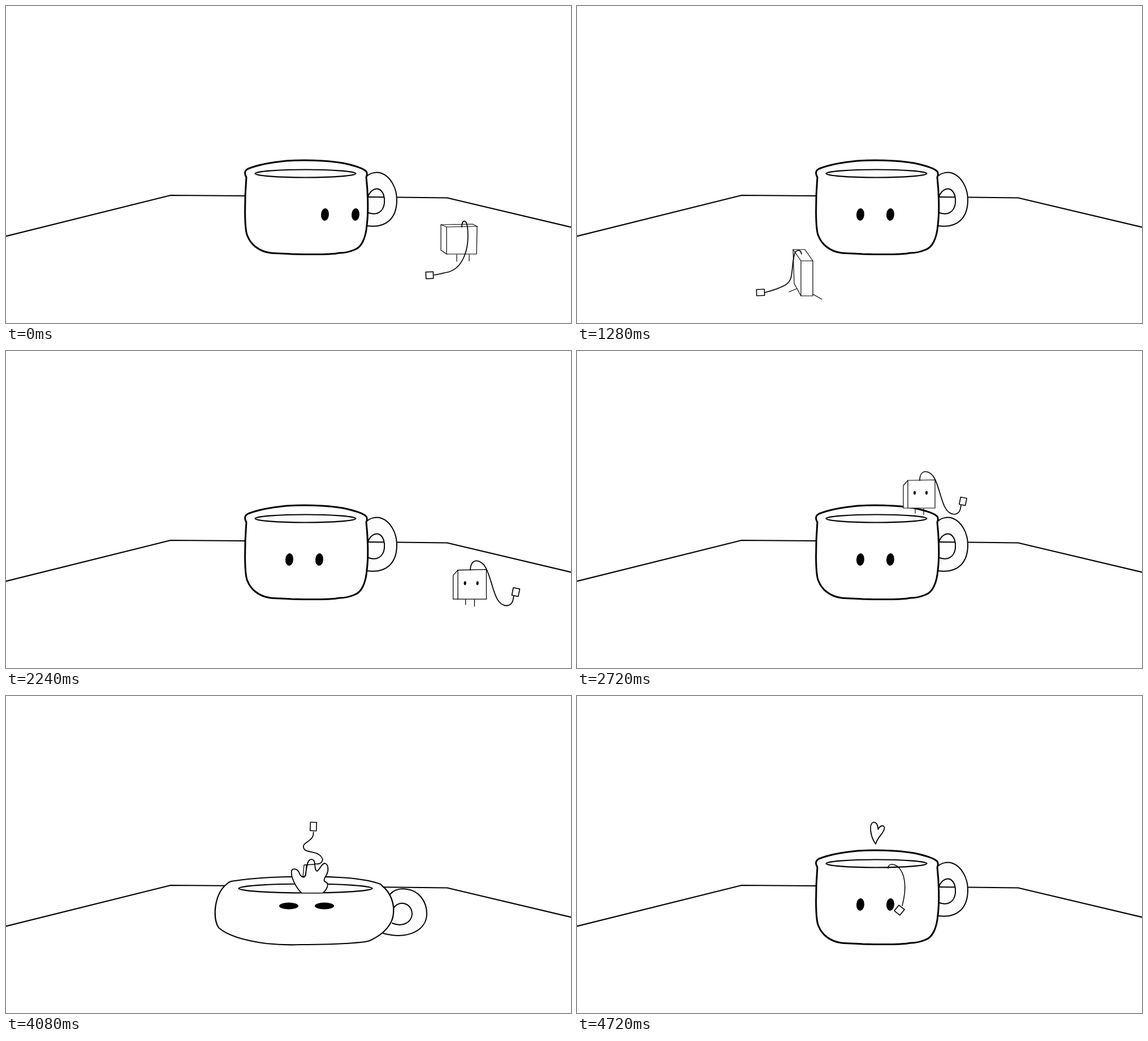
Write an HTML page with a canvas that moves like this. It is 999x561 px and loops after 4880 ms.

```html
<!DOCTYPE html>
<html lang="en">
<head>
<meta charset="utf-8">
<title>Cup and tea bag</title>
<style>
  html, body { margin: 0; width: 100%; height: 100%; overflow: hidden; background: #fff; }
  canvas { display: block; }
</style>
</head>
<body>
<canvas id="stage" width="999" height="561"></canvas>
<script>
const ctx = document.getElementById('stage').getContext('2d');
const LOOP = 4880;
ctx.lineCap = ctx.lineJoin = 'round';

// Each cup part: path at rest, path fully squashed
const cup = {
  body: [
    'M425,303C421,296 422,291 428,288C450,279 475,276 496,274C540,271 585,275 605,280C625,285 637,290 638,295C639,299 638,301 637,303C640,330 641,365 638,388C636,412 628,427 617,431C608,435 598,437 590,437C575,440 540,440 505,439C490,438 475,438 468,437C445,434 432,420 427,407C421,395 422,340 425,303Z',
    'M390,333C392,331 394,329 398,328C430,323 460,321 496,320C540,319 580,320 605,322C635,325 655,330 662,333C664,334 664,335 665,336C680,347 687,368 685,385C684,402 670,421 643,433C635,436 625,436 615,437C590,439 550,440 520,440C495,441 480,440 460,438C430,434 395,427 376,410C364,392 369,350 390,333Z'],
  handle: [
    'M638,301C645,295 655,293 664,296C680,302 691,322 691,343C691,374 674,394 638,389',
    'M679,351C686,343 697,340 709,342C729,344 744,363 744,385C744,414 712,432 667,420'],
  hole: [
    'M640,338C643,328 651,322 659,324C668,328 670,340 669,349C667,365 655,371 641,366',
    'M684,377C689,369 695,366 703,367C713,369 718,377 718,386C717,400 702,410 683,402']
};

// Views of the tea bag; tag is x, y, width, height, angle
const views = {
  back: {
    at: [801, 413],
    body: 'M769,387L825,386 833,390 832,439 779,439 769,432Z',
    lines: 'M769,387L779,391V439M779,391L833,390M797,440V452M819,440V451',
    cord: 'M806,391C806,378 814,376 816,392C820,430 808,468 776,472C768,474 764,475 757,476',
    tag: [749, 476.5, 13, 12, -.03]
  },
  left: {
    at: [391, 354],
    body: 'M384,329L402,328 401,376 397,378 381,378Z',
    lines: 'M384,330L399,331 397,378M399,331L402,328M388,378L381,384M392,378L396,383',
    cord: 'M394,330C394,318 402,317 404,332C407,350 406,377 421,378'
  },
  right: {
    at: [683, 468],
    body: 'M665,427H686L700,447V509H679L667,487Z',
    lines: 'M665,427L679,447V509M679,447H700M672,496L658,502M700,506L716,515',
    cord: 'M680,435C678,425 669,427 667,437C661,463 667,481 651,490C640,496 627,500 615,503',
    tag: [607.5, 503, 14, 11, -.03]
  },
  front: {
    at: [605, 254],
    body: 'M577,238L585,229 633,228V278H577Z',
    lines: 'M585,229V278M598,279V287M613,279V290',
    cord: 'M606,229C606,208 624,210 632,225C645,250 645,288 667,289C677,288 678,280 679,273',
    tag: [682.5, 266, 11, 13, .2],
    eyes: [597, 618, 251]
  },
  below: {
    at: [594, 149],
    body: 'M571,124L619,123 621,165 615,174 569,175 566,144Z',
    lines: 'M571,124L573,167 621,165M573,167L569,175',
    legs: 'M586,171V183M603.5,171V184',
    cord: 'M594,122C592,95 605,92 614,97C635,110 630,172 656,174C664,173 667,168 668,164',
    tag: [672, 156, 11, 15, .45],
    eyes: [583, 604, 146]
  }
};
views.rest = { ...views.front,
  cord: 'M606,229C606,208 628,208 638,230C655,262 690,255 700,312',
  tag: [702, 321, 11, 13, .1] };
views.fall = { ...views.front,
  cord: 'M606,229C600,210 618,200 606,180C596,165 606,155 605,143',
  tag: [605, 135, 11, 15, 0] };

// time, view, x, y, scale
const walk = [
  [0, 'back', 801, 413, 1], [160, 'back', 775, 396, .95], [240, 'back', 736, 376, .85],
  [320, 'back', 675, 357, .75], [400], [800, 'left', 391, 354, 1], [880, 'left', 281, 376, 1.05],
  [1040, 'front', 255, 394, 1.1], [1120, 'front', 257, 419, 1.1], [1280, 'right', 400, 472, 1],
  [1360, 'right', 483, 483, 1], [1520, 'right', 529, 481, 1], [1680, 'right', 650, 472, 1],
  [1760, 'right', 683, 468, 1], [1920, 'right', 750, 443, .98], [2000, 'right', 801, 419, .95],
  [2160, 'right', 838, 414, .92], [2240, 'front', 820, 414, 1.05]
];
// time, view, x, y, height factor
const jump = [
  [2400, 'front', 897, 407], [2480, 'front', 840, 300], [2560, 'front', 740, 214],
  [2640, 'front', 645, 216], [2720, 'front', 605, 254], [2800, 'rest', 595, 254],
  [2880, 'rest', 586, 254], [3120, 'front', 588, 258, .85], [3200, 'front', 590, 250],
  [3280, 'below', 591, 218], [3360, 'below', 592, 190], [3440, 'below', 593, 170],
  [3520, 'below', 593, 157], [3600, 'below', 594, 149], [3680, 'below', 590, 138],
  [3760, 'below', 575, 155], [3840, 'fall', 560, 211], [3920, 'fall', 548, 262],
  [4000, 'fall', 541, 303], [4080]
];
const poses = [...walk, ...jump.map(([t, view, x, y, h = 1]) => [t, view, x, y, 1, h])];
const gaze = [[0, 564, 618], [160, 548, 602], [240, 520, 574], [320, 480, 534], [400, 441, 496],
  [1280, 501, 554], [1520, 533, 586], [1680, 565.5, 621], [2160, 533, 586], [2240, 501, 554]];
const squash = [[0, 0], [4000, .5], [4080, 1], [4160, .75], [4240, .3], [4320, -.08], [4400, 0]];
const splash = [[0, 0], [4000, .5], [4080, 1], [4160, .6], [4240, 0]];
const sink = [[0], [4080, 0, 0], [4160, 6, 28], [4240, 14, 55], [4320]];
const swing = [[0], [4320, -.5], [4400, -.2], [4480, -.12], [4640, -.05], [4720, 0]];
const heart = [[0, 0], [4480, .65], [4640, .85], [4720, 1]];

const at = (keys, t) => keys.findLast(key => key[0] <= t).slice(1);
const lerp = (a, b, k) => a + (b - a) * k;

function morph([from, to], k) {
  const number = /[\d.]+/g, ends = to.match(number);
  let i = 0;
  return from.replace(number, n => lerp(+n, +ends[i++], k).toFixed(2));
}

function ink(d, width, fill) {
  const path = new Path2D(d);
  if (fill) {
    ctx.fillStyle = fill;
    ctx.fill(path);
  }
  ctx.lineWidth = width;
  ctx.stroke(path);
}

function dot(x, y, rx, ry, tilt = .08) {
  ctx.beginPath();
  ctx.ellipse(x, y, rx, ry, tilt, 0, 7);
  ctx.fillStyle = '#000';
  ctx.fill();
}

// Draws with the point (px, py) moved to (x, y) and scaled and turned around it
function placed(x, y, px, py, sx, sy, turn, draw) {
  ctx.save();
  ctx.translate(x, y);
  ctx.rotate(turn);
  ctx.scale(sx, sy);
  ctx.translate(-px, -py);
  draw();
  ctx.restore();
}

function drawTag(x, y, w, h, turn) {
  placed(x, y, 0, 0, 1, 1, turn, () => ink(`M${-w / 2},${-h / 2}h${w}v${h}h${-w}Z`, 1.6, '#fff'));
}

function drawBag([name, x, y, scale, height = 1]) {
  if (!name) return;
  const view = views[name];
  placed(x, y, ...view.at, scale, scale * height, 0, () => {
    ink(view.body, 1.2, '#fff');
    ink(view.lines, 1.2);
    if (view.legs) ink(view.legs, 2.8);
    ink(view.cord, 1.7);
    if (view.tag) drawTag(...view.tag);
    if (view.eyes) {
      const [left, right, level] = view.eyes;
      dot(left, level, 2, 3.2);
      dot(right, level, 2, 3.2);
    }
  });
}

function drawCup(t, k) {
  const handle = morph(cup.handle, k), hole = morph(cup.hole, k);
  ctx.fillStyle = '#fdfdfd';
  ctx.fill(new Path2D(handle + 'Z' + hole + 'Z'), 'evenodd');
  ink(handle, 2);
  ink(hole, 2);
  ink(morph(cup.body, k), lerp(3, 2.2, k), '#fff');
  ctx.beginPath();
  ctx.ellipse(529.5, lerp(296.5, 340.5, k), lerp(89, 118, k), lerp(7, 8, k), 0, 0, 7);
  ctx.fillStyle = '#fcfcfd';
  ctx.fill();
  ctx.lineWidth = 2.2;
  ctx.stroke();
  const [left, right] = at(gaze, t);
  const rx = lerp(7, 17, k), ry = lerp(11, 6, k), y = lerp(369, 371.5, k), tilt = lerp(.08, 0, k);
  dot(lerp(left, 500, k), y, rx, ry, tilt);
  dot(lerp(right, 563, k), y, rx, ry, tilt);
}

function drawSinking(dx, dy) {
  placed(dx, dy, 0, 0, 1, 1, 0, () => {
    if (!dy) ink('M525,320L527,299 546,298M531,300L530,318', 1.3);
    ink('M543.5,241C545,260 518,258 528,272C535,278 556,274 560,290C558,297 552,298 546,297', 1.7);
    drawTag(543.5, 231, 11, 15, .04);
  });
}

function drawSplash(size, level) {
  placed(541, level, 541, 348, size, size, 0, () => ink(
    'M522,348C512,338 503,320 505,309C508,304 515,306 518,312C520,318 524,322 528,320C532,314 530,295 537,290C543,287 546,292 546,298C547,304 546,308 550,310C556,306 558,296 564,296C570,298 571,308 567,316C562,324 560,328 567,330C571,334 567,343 561,348',
    1.8, '#fff'));
}

function draw(t) {
  const [k] = at(squash, t), pose = at(poses, t), level = lerp(304, 348, k);
  ctx.fillStyle = '#fff';
  ctx.fillRect(0, 0, 999, 561);
  ink('M0,407.5L291,335 422,336 693,338.5 780,339.5 999,391.5', 2.2);

  if (t < 1040) drawBag(pose);
  drawCup(t, k);
  if (t >= 1040) {
    ctx.save();
    if (t >= 4000) {
      ctx.beginPath();
      ctx.rect(0, 0, 999, level);
      ctx.clip();
    }
    drawBag(pose);
    ctx.restore();
  }

  const [drops] = at(splash, t);
  if (drops) drawSplash(drops, level);
  const [dx, dy] = at(sink, t);
  if (dx !== undefined) drawSinking(dx, dy);

  const [turn] = at(swing, t);
  if (turn !== undefined) placed(550, 301, 550, 301, 1, 1, turn, () => {
    ink('M550,305C550,297 558,296 566,301C580,312 584,338 575,371', 1.5);
    drawTag(570, 379, 12.5, 13, .68);
  });
  const [love] = at(heart, t);
  if (love) placed(528, 223, 528, 223, love, love, 0, () =>
    ink('M528,262C518,248 516,226 524,223.5C530,223 532,230 532.5,236C536,228 544,228 543.5,234C543,243 532,248 528,262Z', 1.8));
}

const start = performance.now();
function tick() {
  draw((performance.now() - start) % LOOP);
  requestAnimationFrame(tick);
}
tick();
</script>
</body>
</html>
```
